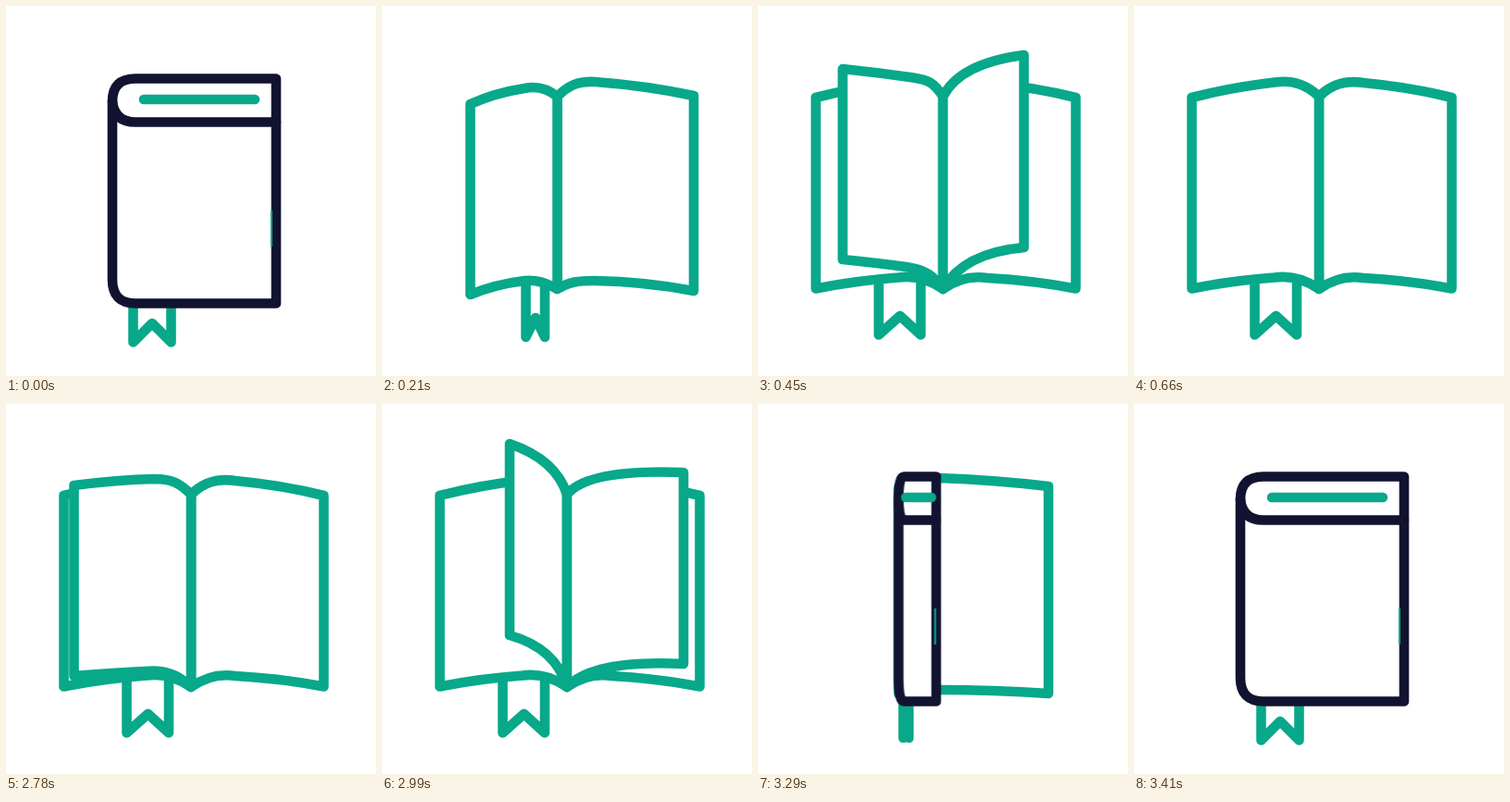
Animation of 400x400 px, one loop 4.44 s. Source, as an HTML page without scripts:

```html
<!DOCTYPE html>
<html lang="en">
<head>
<meta charset="utf-8">
<title>Opening book</title>
<style>
  :root {
    --green: #08a88a;
    --navy: #121331;
    --loop: 4440ms infinite;
    /* a turning page, from right to left */
    --turn1: path("M200 98 Q222 70 326 74 V281 Q228 276 200 306Z");
    --turn2: path("M200 98 Q218 62 287.5 53 V261 Q222 267 200 306Z");
    --turn3: path("M200 98 Q206 58 236 38 V246 Q208 264 200 306Z");
    --turn4: path("M200 98 Q188 60 138 43 V250 Q188 264 200 306Z");
    --turn5: path("M200 98 C190 82 183 80 168 77.5 Q130 72 91.5 68 V274 Q130 278 160 282 C182 285 190 292 200 306Z");
    --turn6: path("M200 98 C188 85 178 81 160 81 Q120 82 73.5 88 V294 Q120 290 160 288.5 C178 289 188 295 200 306Z");
  }
  html, body { margin: 0; width: 100%; height: 100%; overflow: hidden; background: #fff; }
  svg { display: block; width: 100%; height: 100%; }
  path {
    fill: #fff;
    stroke: var(--green);
    stroke-width: 10.6;
    stroke-linecap: round;
    stroke-linejoin: round;
    vector-effect: non-scaling-stroke;
  }

  /* the book moves in 30 ms ticks, three to a segment */
  .ribbon { animation: ribbon var(--loop) steps(3); }
  .right { animation: right var(--loop) steps(3); }
  .left { animation: left var(--loop) steps(3), show var(--loop) step-end; }
  .cover { animation: cover var(--loop) steps(3), hide var(--loop) step-end; }
  .cover path { stroke: var(--navy); }
  .cover .line { fill: none; }
  .cover .title { stroke: var(--green); }
  .cover .edge { stroke: var(--green); stroke-width: 2; stroke-linecap: butt; }
  .a { animation: turn-a var(--loop) step-end; }
  .b { animation: turn-b var(--loop) step-end; }
  .c { animation: turn-c var(--loop) step-end; }

  @keyframes ribbon {
    0%, .67%, 76.12%, 100% { d: path("M137.5 318 V363.5 L158 343 L178.5 363.5 V318"); }
    2.7%, 74.09% { d: path("M157 306 V361 L160 341 L163 361 V306"); }
    4.72%, 72.07% { d: path("M155.5 298 V358 L166 337 L176 358 V298"); }
    6.75%, 70.04% { d: path("M130.5 295 V355.5 L153.5 335 L176 355.5 V295"); }
  }
  @keyframes right {
    0%, .67%, 76.12%, 100% { d: path("M124 90 C135 82 150 80 170 80 Q230 80 291 80 V320 Q230 320 170 320 C150 320 135 320 124 312Z"); }
    2.7%, 74.09% { d: path("M152 90 C160 84 175 80 195 80 Q255 82 314 89 V313 Q255 309 195 309 C175 309 165 310 152 313Z"); }
    4.72%, 72.07% { d: path("M189.5 98 C201 86 212 81 230 82 Q285 86 337 97 V308 Q285 298 230 297 C212 297 203 298 189.5 306Z"); }
    6.75%, 70.04% { d: path("M200 98 C214 84 229 80 248 83 Q300 88 343.5 99 V305.5 Q300 297 248 294 C229 291 214 296 200 306Z"); }
  }
  @keyframes left {
    0%, 2.7%, 74.09%, 100% { d: path("M152 90 C158 88 164 88 170 89 Q182 91 193 97 V312 Q182 306 170 306 C164 306 158 308 152 313Z"); }
    4.72%, 72.07% { d: path("M189.5 98 C180 90 168 86 154 89 Q122 94 95.5 106 V312 Q122 301 154 297 C168 295.5 178 300 189.5 306Z"); }
    6.75%, 70.04% { d: path("M200 98 C186 84 171 80 152 82.5 Q105 88 62.5 99 V305.5 Q105 297 152 293.5 C171 291 186 296 200 306Z"); }
  }
  @keyframes cover {
    0%, .67%, 76.12%, 100% { transform: translateX(115px) scaleX(1) translateX(-115px); }
    2.7%, 74.09% { transform: translateX(152px) scaleX(.23) translateX(-115px); }
  }
  @keyframes show {
    0%, 74.09%, 100% { visibility: hidden; }
    3.37% { visibility: visible; }
  }
  @keyframes hide {
    0%, 74.09%, 100% { visibility: visible; }
    3.37% { visibility: hidden; }
  }

  @keyframes turn-a {
    0%, 11.48%, 70.04%, 100% { d: none; }
    7.43%, 69.36% { d: var(--turn1); }
    8.1%, 68.69% { d: var(--turn2); }
    8.78%, 68.01% { d: var(--turn3); }
    9.45%, 67.34% { d: var(--turn4); }
    10.13%, 66.66% { d: var(--turn5); }
    10.81%, 65.99% { d: var(--turn6); }
  }
  @keyframes turn-b {
    0%, 13.51%, 68.01%, 100% { d: none; }
    9.45%, 67.34% { d: var(--turn1); }
    10.13%, 66.66% { d: var(--turn2); }
    10.81%, 65.99% { d: var(--turn3); }
    11.48%, 65.31% { d: var(--turn4); }
    12.16%, 64.63% { d: var(--turn5); }
    12.83%, 63.96% { d: var(--turn6); }
  }
  @keyframes turn-c {
    0%, 14.86%, 65.99%, 100% { d: none; }
    11.48%, 65.31% { d: var(--turn1); }
    12.16%, 64.63% { d: var(--turn2); }
    12.83%, 63.96% { d: var(--turn3); }
    13.51%, 63.28% { d: var(--turn4); }
    14.18%, 62.61% { d: var(--turn6); }
  }
</style>
</head>
<body>
<svg viewBox="0 0 400 400">
  <path class="ribbon"/>
  <path class="right"/>
  <path class="left"/>
  <path class="a"/>
  <path class="b"/>
  <path class="c"/>
  <g class="cover">
    <path d="M140 78.5 H292 V321.5 H140 Q115 321.5 115 296 V103 Q115 78.5 140 78.5Z"/>
    <path class="line" d="M115 103 Q117 125.5 140 125.5 H292"/>
    <path class="line title" d="M149 101 H269"/>
    <path class="line edge" d="M287 221 V260"/>
  </g>
</svg>
</body>
</html>
```
